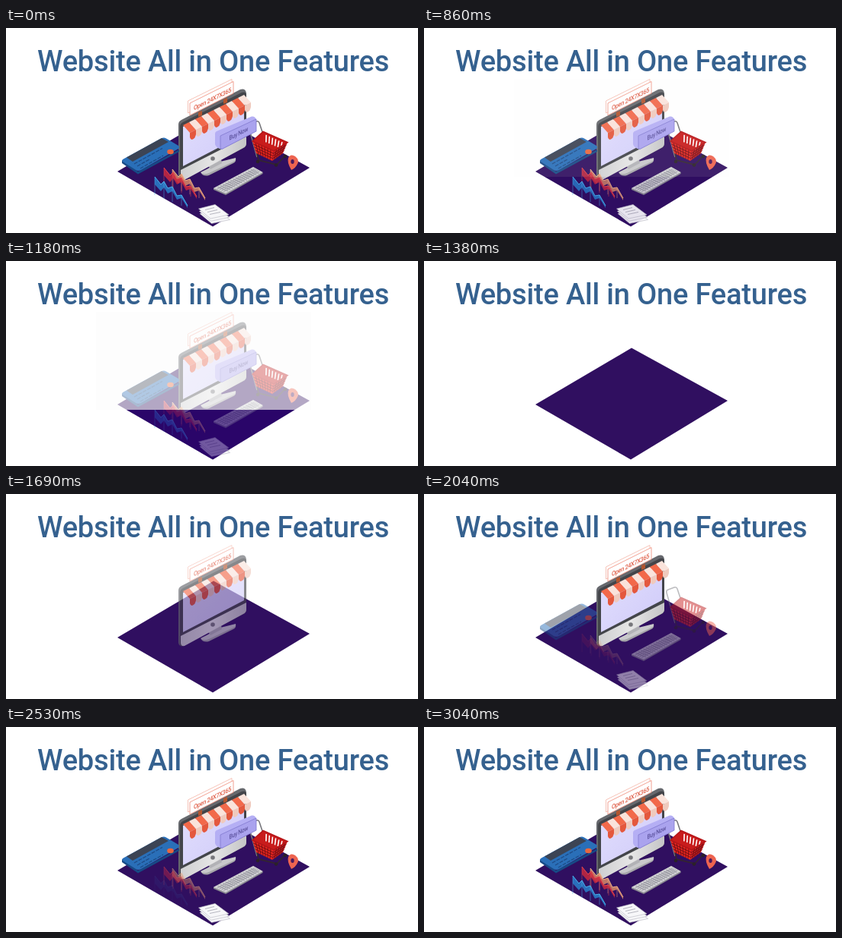
Write an HTML page that moves like this. It is 540 px wide and 270 px high and loops after 3240 ms.

```html
<!DOCTYPE html>
<html lang="en">
<head>
<meta charset="utf-8">
<title>Website All in One Features</title>
<style>
html, body { margin: 0; width: 100%; height: 100%; overflow: hidden; background: #fff; }
svg { display: block; width: 540px; height: 270px; }
.title { font: 500 38px Roboto, "Open Sans", sans-serif; letter-spacing: -.2px; fill: #35618f; }
.label { font: 500 8.5px Roboto, sans-serif; letter-spacing: -.4px; }

#veil, #shop, #items, #buy, #tan, #red, #blue { animation: 3240ms step-end infinite; }
#veil { animation-name: veil; }
#shop { animation-name: shop; }
#items { animation-name: items; }
#buy { animation-name: buy; }
#tan { animation-name: tan; }
#red { animation-name: red; }
#blue { animation-name: blue; }

/* 860-1380 ms: wash everything out */
@keyframes veil {
  0% { opacity: 0; }
  26.5432% { opacity: 0; animation-timing-function: steps(13, jump-both); }
  42.5926% { opacity: 1; }
  42.5927%, 100% { opacity: 0; }
}
/* 1430-1930 ms */
@keyframes shop {
  0% { opacity: 1; }
  42.5926% { opacity: 0; }
  44.1358% { opacity: .2; animation-timing-function: steps(10, jump-both); }
  59.5679%, 100% { opacity: 1; }
}
/* 1990-2190 ms */
@keyframes items {
  0% { opacity: 1; }
  42.5926% { opacity: 0; }
  61.4198% { opacity: .15; animation-timing-function: steps(4, jump-both); }
  67.5926%, 100% { opacity: 1; }
}
/* 2240-2480 ms */
@keyframes buy {
  0% { opacity: 1; }
  42.5926% { opacity: 0; }
  69.1358% { opacity: 0; animation-timing-function: steps(4, jump-both); }
  76.5432%, 100% { opacity: 1; }
}
/* 2530-3040 ms: the chart, back to front */
@keyframes tan {
  0% { opacity: 1; }
  42.5926% { opacity: 0; }
  61.4198% { opacity: .2; }
  78.0864% { opacity: .45; animation-timing-function: steps(5, jump-both); }
  85.8025%, 100% { opacity: 1; }
}
@keyframes red {
  0% { opacity: 1; }
  42.5926% { opacity: 0; }
  61.4198% { opacity: .15; }
  78.0864% { opacity: .4; animation-timing-function: steps(5, jump-both); }
  85.8025%, 100% { opacity: 1; }
}
@keyframes blue {
  0% { opacity: 1; }
  42.5926% { opacity: 0; }
  78.0864% { opacity: 0; animation-timing-function: steps(10, jump-both); }
  93.8272%, 100% { opacity: 1; }
}
</style>
</head>
<body>
<svg viewBox="0 0 540 270" xmlns="http://www.w3.org/2000/svg">
  <defs>
    <linearGradient id="screen" x1="0" y1="0" x2="1" y2="1">
      <stop offset="0" stop-color="#e3e0fd"/><stop offset="1" stop-color="#cfcaf9"/>
    </linearGradient>
    <linearGradient id="chin" x1="0" y1="0" x2="1" y2="0">
      <stop offset="0" stop-color="#cfcfd1"/><stop offset=".5" stop-color="#e6e6e6"/><stop offset="1" stop-color="#c4c4c6"/>
    </linearGradient>
    <path id="floor" d="M146 189L272 114.500L398 184L271 261.500Z"/>
    <path id="sheet" d="M252.500 238L274 232.500L292 246L268 251Z"/>
  </defs>

  <text class="title" x="41" y="57">Website All in One Features</text>
  <use href="#floor" fill="#300f60"/>

  <g id="shop">
    <path d="M255 190Q258 192 264 190L301 172Q302 176 298 178L266 194Q258 196 255 190Z" fill="#a5a5a9"/>
    <path d="M255 190L263 186L281 176L301 171Q302 174 298 176L266 191Q258 194 255 190Z" fill="#c9c9cb"/>
    <path d="M263 178L281 168L283 178L268 186Z" fill="#b2b2b6"/>
    <path d="M229 200Q226 199 226 195V127Q226 123 230 121L307 81Q314 79 315 86V152Q315 156 311 158L234 199Z" fill="#66686d"/>
    <path d="M230 201Q228 200 228 196V130Q228 126 232 124L309 85Q315 83 315 89V152Q315 156 311 158Z" fill="#43454a"/>
    <path d="M229 187L315 143V152Q315 156 311 158L234 200Q229 201 229 196Z" fill="url(#chin)"/>
    <path d="M232 130L312 90V140L232 182Z" fill="url(#screen)"/>
    <circle cx="271" cy="172" r="2.800" fill="#77777b"/>

    <g fill="#fff" stroke="#ee8a76" stroke-width=".8">
      <path d="M238.500 96L296 67.500V83L238.500 112Z" stroke="#f4b5a8"/>
      <path d="M241 99L298 70.500V86L241 115Z"/>
    </g>
    <text class="label" transform="matrix(.87 -.43 0 1 246 108.500)" fill="#e0604a">Open 24X7X365</text>
    <path d="M252 111l5-2v6l-5 2zM285 94l5-2v6l-5 2z" fill="#b3552f"/>
    <g id="awning"></g>
  </g>

  <g id="items">
    <path d="M152 174L173 189L227 160V163L173 192.500L152 178Z" fill="#174a86"/>
    <path d="M154 172.500L203 145.500Q207 143.500 210 145.500L226 155Q228 157 226 159L177 187Q173 189 170 187L153 176Q151 174 154 172.500Z" fill="#2a6fb8"/>
    <path d="M158 170.500L204 145L213 150L166 176Z" fill="#3c4454"/>
    <path d="M168 179L205 158.500M172 182L188 173M176 185L206 168" stroke="#1d4a85" stroke-width="1.200" stroke-dasharray="5 1.500"/>
    <ellipse cx="215.500" cy="163" rx="4.300" ry="3.300" fill="#e9673f"/>

    <path d="M272 211L324 183L336.500 190V192L288 220L272 213Z" fill="#8b8b92"/>
    <path d="M272 211L324 183L336.500 190L288 218Z" fill="#d2d2d5"/>
    <g id="keys" stroke="#8f8f98" stroke-width=".8"></g>

    <path d="M329 170L318 130Q317 127 320 126L328 123Q331 122 332 125L336 137" fill="none" stroke="#77777c" stroke-width="1.600"/>
    <path d="M329 165L331 174L355 180L366 168" fill="none" stroke="#34262e" stroke-width="1.600"/>
    <path d="M323 149L337 136.500L369 150.500L351 162Z" fill="#c81c1c"/>
    <g id="slits" stroke="#fff" stroke-width="1.600"></g>
    <path d="M323 149L351 162L349 175L328 165Z" fill="#e5261f"/>
    <path d="M351 162L369 150.500L363 165L349 175Z" fill="#d02020"/>
    <g id="basket" stroke="#6e0d14" stroke-width=".9"></g>
    <path d="M323 149L337 136.500L369 150.500L351 162Z" fill="none" stroke="#b51518" stroke-width="1.500"/>
    <g fill="#2b2228"><circle cx="330" cy="176" r="2.300"/><circle cx="354" cy="180.500" r="2.300"/><circle cx="366" cy="169" r="2.300"/></g>

    <path d="M374 187Q368 177 370 171Q373 165 379 169Q385 174 382 179Q380 184 374 187Z" fill="#ee6450"/>
    <ellipse cx="375.500" cy="176" rx="2.200" ry="3" fill="#4c1a5d"/>

    <g fill="#f7f7f9" stroke="#b7b7c1" stroke-width=".6">
      <use href="#sheet" x="1.500" y="6.500"/><use href="#sheet" x=".8" y="3.300"/><use href="#sheet"/>
    </g>
    <path d="M261 239.500L273 236.500M264 242.500L277 239.500M267 245.500L281 242.500" stroke="#a5a5b0" stroke-width=".8"/>
  </g>

  <g id="buy">
    <path d="M274 139Q274 137 276 136L322 116.500Q327 116 328 121V136L283 160Q275 158 274 153Z" fill="#b5aff4"/>
    <path d="M281 142L328 120V136L283 159.500Q281 160 281 157Z" fill="#aaa3ee" stroke="#8179d0" stroke-width=".8"/>
    <text class="label" transform="matrix(.8 -.4 0 1 292.500 148)" fill="#5d539f">Buy Now</text>
  </g>

  <g id="tan"></g>
  <g id="red"></g>
  <g id="blue"></g>

  <g id="veil">
    <use href="#floor" fill="#27006f"/>
    <path d="M118 67H400V196H118Z" fill="#fdfdfd"/>
  </g>
</svg>
<script>
const add = (id, d, attrs = {}) => {
  const p = document.createElementNS('http://www.w3.org/2000/svg', 'path');
  p.setAttribute('d', d);
  for (const k in attrs) p.setAttribute(k, attrs[k]);
  document.getElementById(id).append(p);
};
const mix = (a, b, t) => [a[0] + (b[0] - a[0]) * t, a[1] + (b[1] - a[1]) * t];
const line = (a, b) => `M${a}L${b}`;

// Sloping canopy with a scalloped valance
for (let i = 0; i < 10; i++) {
  const x = 232 + i * 8, y = 128 - i * 4;
  const [top, front] = i % 2 ? ['#fae3db', '#efcabe'] : ['#f2694a', '#e4583d'];
  add('awning', `M${x} ${y}l8-4 9 10-8 4z`, { fill: top });
  add('awning', `M${x + 9} ${y + 10}l8-4v6q-1 5-4 6.500t-4-2.500z`, { fill: front });
}

// Grid lines across a four-cornered face
const grid = (id, [a, b, c, d], cols, rows) => {
  for (let i = 1; i < cols; i++) add(id, line(mix(a, b, i / cols), mix(d, c, i / cols)));
  for (let i = 1; i < rows; i++) add(id, line(mix(a, d, i / rows), mix(b, c, i / rows)));
};
grid('keys', [[274, 211], [324, 184.5], [334.5, 190], [288, 216.5]], 15, 5);
grid('slits', [[337, 139], [366, 152], [364, 160], [337, 149]], 7, 1);
grid('basket', [[323, 149], [351, 162], [349, 175], [328, 165]], 7, 4);
grid('basket', [[351, 162], [369, 150.5], [363, 165], [349, 175]], 5, 4);

// Falling chart ribbon with drop lines
const curve = [[0, 0], [8, 10], [12, 6], [17, 15], [23, 13], [29, 25], [35, 24], [43, 38]];
const series = (id, x, y, fill, stroke) => {
  const top = curve.map(([dx, dy]) => [x + dx, y + dy]);
  const low = top.map(([px, py], i) => [px, py + 10 - i]).reverse();
  add(id, `M${top.concat(low).join('L')}Z`, { fill, opacity: .85 });
  add(id, `M${top.join('L')}`, { fill: 'none', stroke, 'stroke-width': 1 });
  for (let i = 0; i < 7; i += 2) {
    const [px, py] = top[i];
    add(id, `M${px} ${py}V${y + 24 + (px - x) * .4}`, { stroke, 'stroke-width': .7, opacity: .7 });
  }
};
series('tan', 218, 186, '#d98a68', '#f0b088');
series('red', 207, 184, '#c8283f', '#e8484c');
series('blue', 195, 196, '#2a80cc', '#48b4ee');
</script>
</body>
</html>
```
